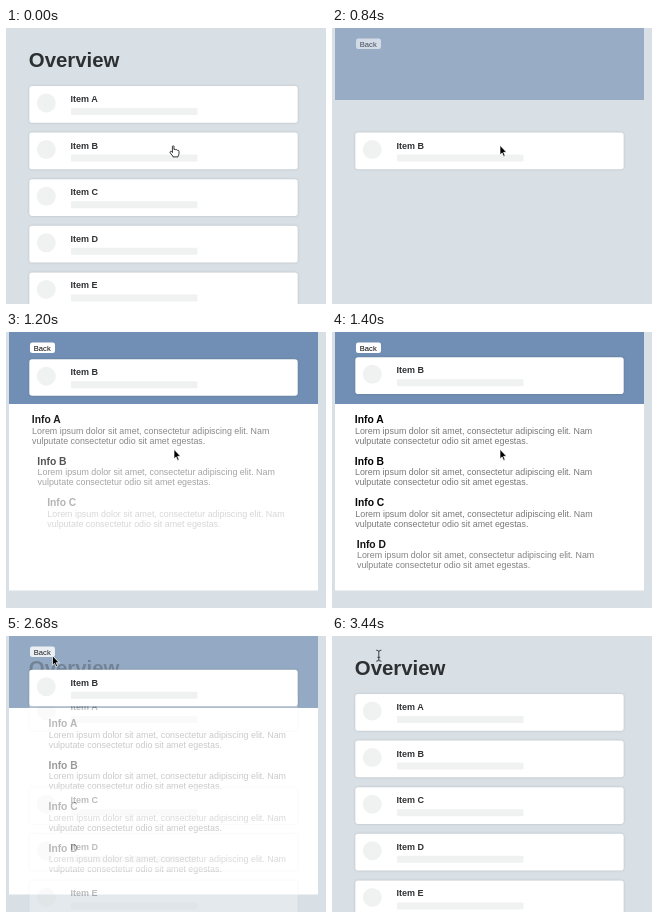
An HTML page that plays this animation: 320x276 px, repeating every 3.64 s.

```html
<!DOCTYPE html>
<html lang="en">
<head>
<meta charset="utf-8">
<title>Overview</title>
<style>
  html, body { margin: 0; height: 100%; overflow: hidden; background: #d9e0e5; }
  svg { display: block; width: 100vw; height: 100vh; font-family: "Liberation Sans", Arial, sans-serif; }
  .card { filter: drop-shadow(0 .7px .8px rgba(0, 0, 0, .17)); }
  .bold { font-weight: bold; }
</style>
</head>
<body>
<svg viewBox="0 0 320 276">
  <rect id="sheet" x="3" y="72" width="309" height="186.5" fill="#fff"/>
  <rect id="header" x="3" width="309" height="72" fill="#718fb4"/>
  <g id="back">
    <rect x="24" y="10.5" width="25" height="10.5" rx="2.3" fill="#fff"/>
    <text x="27.8" y="18.5" font-size="7.6">Back</text>
  </g>
  <g id="infos"></g>
  <text id="title" class="bold" x="22.8" y="38.6" font-size="20.4" fill="#2d3033">Overview</text>
  <g id="cards"></g>
  <g stroke-linejoin="round" stroke-linecap="round">
    <path id="arrow" d="M0 0V9.2L2.1 7.3L3.6 10.8L5.1 10.1L3.6 6.7H6.4Z" stroke="#fff" stroke-width=".7"/>
    <path id="hand" fill="#fff" stroke="#222" stroke-width=".9"
      d="M-1.6 6.6V1.2Q-1.6 .3 -.8 .3T0 1.2V4Q1.3 3.2 1.8 4.3Q3 3.7 3.4 4.8Q5 4.4 5 6V7.8Q5 9.3 4 10.7V11.4H-1.1V10.6L-3.9 7.3Q-4.4 6.2 -3.4 5.8Q-2.7 5.7 -1.6 6.6Z"/>
    <path id="beam" fill="none" stroke="#333" stroke-width=".9" d="M-2.2 -5.5Q0 -5.5 0 -4Q0 -5.5 2.2 -5.5M0 -4V4M-2.2 5.5Q0 5.5 0 4Q0 5.5 2.2 5.5M-1 1.6H1"/>
  </g>
</svg>
<script>
const LOOP = 3640;
const $ = id => document.getElementById(id);

$("cards").innerHTML = [..."ABCDE"].map(letter => `<g class="card">
  <rect x="23.3" width="268.4" height="36.7" rx="2.8" fill="#fff"/>
  <circle cx="40.3" cy="17" r="9.5" fill="#f0f1f1"/>
  <text class="bold" x="64.6" y="16" font-size="9" fill="#303234">Item ${letter}</text>
  <rect x="65" y="22" width="126.5" height="7" rx="1" fill="#f0f1f1"/></g>`).join("");

$("infos").innerHTML = [..."ABCD"].map(letter => `<g>
  <text class="bold" x="22.8" y="91" font-size="10.3">Info ${letter}</text>
  <g font-size="8.9" fill="#777">
    <text x="23" y="101.6">Lorem ipsum dolor sit amet, consectetur adipiscing elit. Nam</text>
    <text x="23" y="111.6">vulputate consectetur odio sit amet egestas.</text>
  </g></g>`).join("");

const cards = [...$("cards").children];
const infos = [...$("infos").children];

const span = (t, from, to) => Math.min(1, Math.max(0, (t - from) / (to - from)));
const easeOut = p => 1 - (1 - p) ** 3;
const easeInOut = p => p < .5 ? 4 * p ** 3 : 1 - 4 * (1 - p) ** 3;
const mix = (a, b, p) => a + (b - a) * p;
const move = (el, x, y) => el.setAttribute("transform", `translate(${x} ${y})`);
const fade = (el, opacity) => {
  el.style.opacity = opacity;
  el.style.display = opacity > 0 ? "" : "none";
};

function draw(t) {
  const header = span(t, 640, 960) - span(t, 2560, 2915);
  fade($("header"), header);
  fade($("back"), span(t, 680, 960) - span(t, 2600, 3040));
  fade($("sheet"), span(t, 900, 1150) - span(t, 2800, 3080));

  const list = 1 - span(t, 600, 840) + span(t, 2600, 2860);
  fade($("title"), list);

  const lift = easeInOut(span(t, 840, 1280)) - easeInOut(span(t, 2550, 2990));
  cards.forEach((card, i) => {
    const y = 58 + i * 46.6;
    const chosen = i === 1;
    move(card, 0, chosen ? mix(y, 25.3, lift) : y);
    fade(card, chosen ? 1 : list);
  });

  infos.forEach((info, i) => {
    const start = 1048 + i * 60;
    const enter = easeOut(span(t, start, start + 300));
    const leave = easeOut(span(t, 2560, 2880));
    move(info, 26 * (1 - enter + leave), i * 41.6);
    fade(info, enter * (1 - .8 * leave) * (1 - span(t, 2840, 3000)));
  });

  const travel = easeOut(span(t, 1740, 2300));
  move($("arrow"), mix(168, 46.5, travel), mix(117.6, 20, travel));
  move($("hand"), 168, 117.5);
  move($("beam"), 46.8, 19.7);
  fade($("hand"), t < 240 ? 1 : 0);
  fade($("arrow"), t >= 240 && t < 3440 ? 1 : 0);
  fade($("beam"), t >= 3440 ? 1 : 0);
}

const begin = performance.now();
function tick() {
  draw((performance.now() - begin) % LOOP);
  requestAnimationFrame(tick);
}
tick();
</script>
</body>
</html>
```
